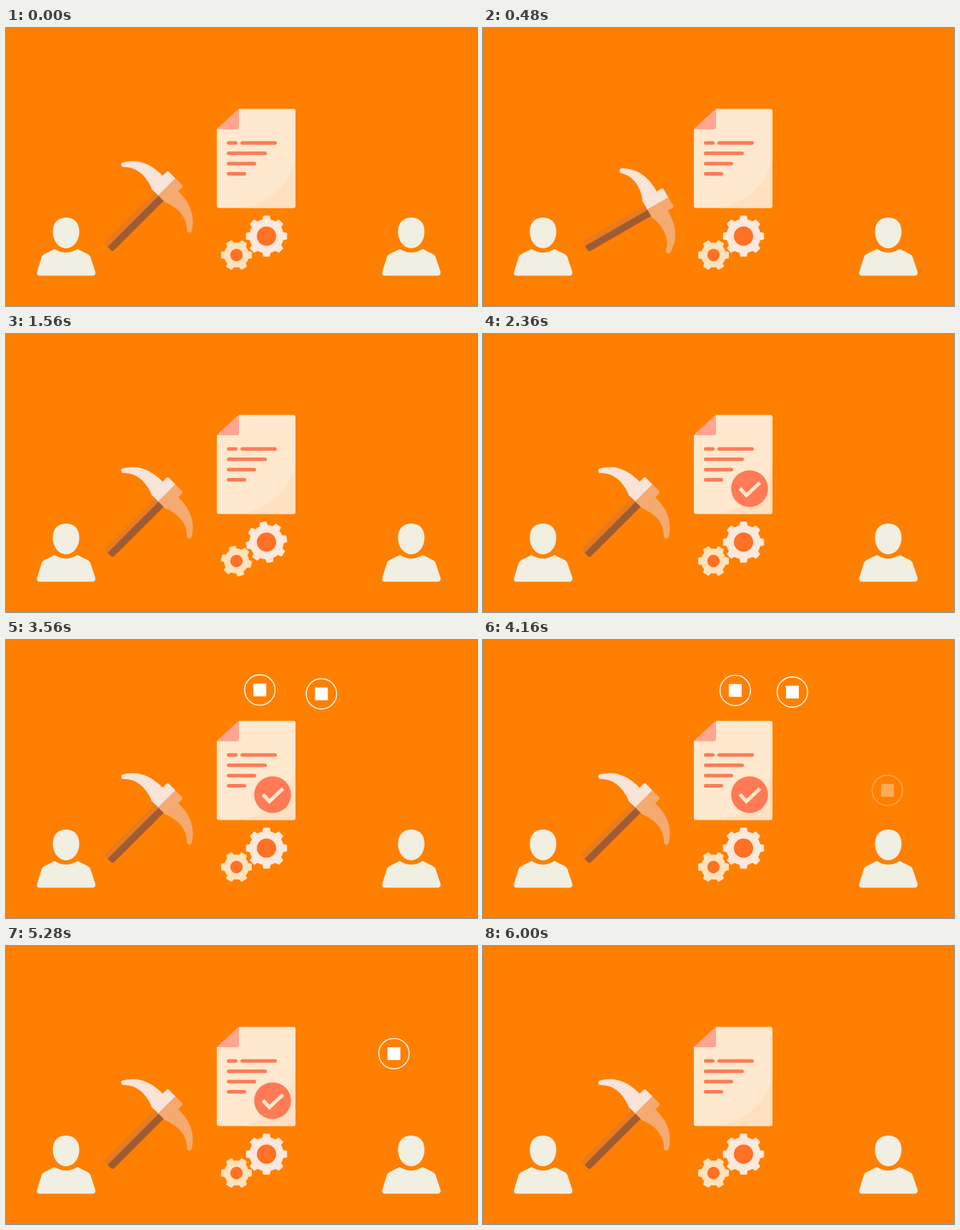
An HTML page for the animation above (6.36 s loop, 659x390 px).

```html
<!DOCTYPE html>
<html>
<head>
<meta charset="utf-8">
<style>
html, body { margin: 0; width: 100%; height: 100%; overflow: hidden; background: #ff8000; }
svg { display: block; }
</style>
</head>
<body>
<svg width="659" height="390" viewBox="0 0 659 390">
  <defs>
    <g id="person" fill="#f1efe2">
      <path d="M84 266C97 266 102.500 275 102.500 286C102.500 299 94 309 84 309S65.500 299 65.500 286C65.500 275 71 266 84 266Z"/>
      <path d="M68 310Q84 320 100 310L114 317Q117 318.500 118 321L125 342Q126 347.500 120 347.500H48Q42 347.500 43.500 342L50 321Q51 318.500 54 317Z"/>
    </g>
    <g id="blade">
      <path d="M100 -15Q111 -46 92 -63.500Q92 -70 97 -68Q124 -52 123 -15Z"/>
      <path d="M99 0V-13Q99 -15.500 101 -15.500H130Q133 -15.500 133 -13V0Z"/>
    </g>
    <g id="coin">
      <circle r="21.300" fill="none" stroke="#fff" stroke-width="1.400"/>
      <rect x="-9" y="-9" width="18" height="18" fill="#fff"/>
    </g>
  </defs>

  <use href="#person"/>
  <use href="#person" x="483"/>

  <g id="pick">
    <g transform="translate(147 309) rotate(-45) translate(0 -5.500)">
      <path d="M2 -7H100V.5H-2V-3Q-2 -7 2 -7Z" fill="#e87b20"/>
      <path d="M-2 .5H100V10.500H1Q-2 10.500 -2 7Z" fill="#9f5c34"/>
      <use href="#blade" fill="#f8e4d8"/>
      <use href="#blade" fill="#f4aa70" transform="scale(1 -1)"/>
    </g>
  </g>

  <g id="coins"></g>

  <path d="M295 142L326 113.500H402Q405 113.500 405 116.500V249.500Q405 252.500 402 252.500H298Q295 252.500 295 249.500Z" fill="#ffe8cd"/>
  <path d="M405 180V249.500Q405 252.500 402 252.500H333Q396 235 405 180Z" fill="#ffe0c0"/>
  <path d="M295 142L326 113.500V139Q326 142 323 142Z" fill="#ffa592"/>
  <path d="M311.500 161.300H321.500M330.500 161.300H376.500M311.500 175.800H362.500M311.500 190.200H347.500M311.500 204.600H333.500"
        stroke="#fc7c57" stroke-width="5" stroke-linecap="round"/>

  <g id="badge">
    <circle r="25.800" fill="#ff7a55"/>
    <path d="M-13.500 -.5L-4.500 9.500L14.500 -8.500" fill="none" stroke="#ffe8cd" stroke-width="5"/>
  </g>

  <g id="small"><path fill="#ffe2bd" stroke="#ffe2bd"/><circle r="8.700" fill="#ff7124"/></g>
  <g id="big"><path fill="#fde8dc" stroke="#fde8dc"/><circle r="13.500" fill="#ff7124"/></g>
</svg>
<script>
const LOOP = 6360, COINS = 3, COIN_GAP = 640, LAUNCH = 2861;
const el = id => document.getElementById(id);
const clamp = x => Math.max(0, Math.min(1, x));
const span = (t, a, b) => clamp((t - a) / (b - a));
const inOut = p => p < .5 ? 2 * p * p : 1 - 2 * (1 - p) ** 2;
const outBack = p => 1 + 4.2 * (p - 1) ** 3 + 3.2 * (p - 1) ** 2;

function gearPath(teeth, inner, outer) {
  const step = 2 * Math.PI / teeth, points = [];
  for (let i = 0; i < teeth; i++)
    for (const [f, r] of [[-.5, inner], [-.27, inner], [-.17, outer], [.17, outer], [.27, inner]]) {
      const a = (i + f) * step;
      points.push((r * Math.cos(a)).toFixed(2) + ' ' + (r * Math.sin(a)).toFixed(2));
    }
  return 'M' + points.join('L') + 'Z';
}

for (const [id, ...shape] of [['big', 8, 23, 28], ['small', 6, 16.5, 20.8]]) {
  const path = el(id).firstChild;
  path.setAttribute('d', gearPath(...shape));
  path.setAttribute('stroke-width', 2);
  path.setAttribute('stroke-linejoin', 'round');
}
el('coins').innerHTML = '<use href="#coin"/>'.repeat(COINS);
const coins = [...el('coins').children];

const quad = (a, b, c, p) => (1 - p) ** 2 * a + 2 * p * (1 - p) * b + p * p * c;
const cubic = (a, b, c, d, p) => (1 - p) * quad(a, b, c, p) + p * quad(b, c, d, p);

// Rise from behind the sheet, then an accelerating arc to the right.
function coinAt(t) {
  if (t < LAUNCH) {
    const p = inOut(span(t, LAUNCH - 480, LAUNCH));
    return [quad(333, 315, 352, p), quad(185, 90, 71, p), t > LAUNCH - 480 ? 1 : 0];
  }
  const s = t - 2920;
  const p = clamp(.015 + .000279 * s + 3.82e-7 * s * s);
  return [cubic(352, 420, 560, 568, p), cubic(71, 50, 100, 230, p), 1 - span(p, .85, 1)];
}

const place = (node, x, y, more = '') =>
  node.setAttribute('transform', `translate(${x} ${y}) ${more}`);

function draw(t) {
  const swing = 7.5 * (1 - Math.cos(2 * Math.PI * span(t, 0, 960)));
  el('pick').setAttribute('transform', `rotate(${swing} 147 309)`);

  const turn = 180 * inOut(span(t, 1240, 1920));
  place(el('big'), 364.5, 292, `rotate(${turn})`);
  place(el('small'), 322.5, 318.5, `rotate(${-turn * 8 / 6})`);

  const pop = outBack(span(t, 1720, 2120)) * (1 - inOut(span(t, 5560, 5960)));
  place(el('badge'), 373, 217, `scale(${Math.max(0, pop)})`);

  coins.forEach((coin, i) => {
    const [x, y, alpha] = coinAt(t - i * COIN_GAP);
    place(coin, x, y);
    coin.setAttribute('opacity', alpha);
  });
}

const start = performance.now();
(function frame() {
  draw((performance.now() - start) % LOOP);
  requestAnimationFrame(frame);
})();
</script>
</body>
</html>
```
